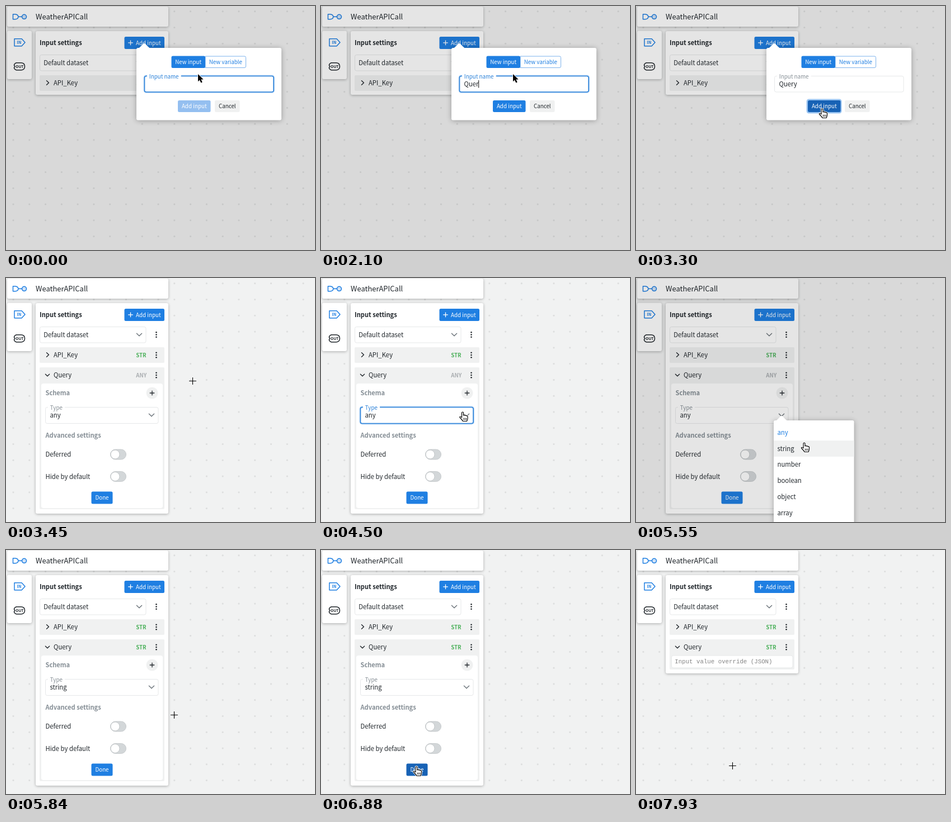
Recreate the animation shown at these times as an HTML page with a canvas. Size 552 by 437 pixels, loop 8 s.

```html
<!DOCTYPE html>
<html lang="en">
<head>
<meta charset="utf-8">
<title>Input settings</title>
<style>
html, body { margin: 0; width: 100%; height: 100%; overflow: hidden; background: #f1f2f2; }
canvas { display: block; }
</style>
</head>
<body>
<canvas id="stage" width="552" height="437"></canvas>
<script>
const ctx = document.getElementById('stage').getContext('2d');
const LOOP = 8000, TICK = 150;
const SANS = '"Noto Sans CJK JP", "Noto Sans CJK SC", "Noto Sans CJK", "Open Sans", sans-serif';
const MONO = '"Liberation Mono", monospace';
const BLUE = '#1f7fe2', DARK_BLUE = '#1762b5', INK = '#20262b', GREY = '#858e95';
const PALE = '#f0f1f1', LINE = '#e6e8e9';
const BODY = 11.3, SMALL = 9.8;

function text(str, x, y, { size = BODY, color = INK, weight = 400, family = SANS } = {}) {
  ctx.font = `${weight} ${size}px ${family}`;
  ctx.fillStyle = color;
  ctx.fillText(str, x, y);
  return ctx.measureText(str).width;
}

function box(x, y, w, h, { r = 3, fill, stroke, line = 1, shadow = 0 } = {}) {
  ctx.save();
  ctx.beginPath();
  ctx.roundRect(x, y, w, h, r);
  if (shadow) {
    ctx.shadowColor = 'rgba(0,0,0,.3)';
    ctx.shadowBlur = shadow;
    ctx.shadowOffsetY = 1;
  }
  if (fill) { ctx.fillStyle = fill; ctx.fill(); }
  if (stroke) { ctx.strokeStyle = stroke; ctx.lineWidth = line; ctx.stroke(); }
  ctx.restore();
}

function disc(x, y, r, fill, stroke) {
  ctx.beginPath();
  ctx.arc(x, y, r, 0, Math.PI * 2);
  if (fill) { ctx.fillStyle = fill; ctx.fill(); }
  if (stroke) { ctx.strokeStyle = stroke; ctx.stroke(); }
}

// Draws an SVG path with its origin at x, y.
function path(d, x, y, { fill, stroke, line = 1.5 } = {}) {
  const p = new Path2D(d);
  ctx.save();
  ctx.translate(x, y);
  ctx.lineJoin = ctx.lineCap = 'round';
  if (stroke) { ctx.strokeStyle = stroke; ctx.lineWidth = line; ctx.stroke(p); }
  if (fill) { ctx.fillStyle = fill; ctx.fill(p); }
  ctx.restore();
}

const plus = (x, y, r, color, line = 1.3) =>
  path(`M${-r} 0H${r}M0 ${-r}V${r}`, x, y, { stroke: color, line });
const chevronDown = (x, y, w = 4, color = INK) =>
  path(`M${-w} ${-w / 2}L0 ${w / 2}L${w} ${-w / 2}`, x, y, { stroke: color, line: 1.4 });
const kebab = (x, y) => [-4.3, 0, 4.3].forEach(dy => disc(x, y + dy, 1.3, INK));

function button(label, x, y, w, h, fill, color = '#fff', weight = 500) {
  box(x, y, w, h, { r: 2.5, fill });
  ctx.textAlign = 'center';
  text(label, x + w / 2, y + h / 2 + 3.7, { size: SMALL, color, weight });
  ctx.textAlign = 'left';
}

function field(label, value, x, y, w, h, focused) {
  if (focused) box(x, y, w, h, { stroke: 'rgba(31,127,226,.3)', line: 4 });
  box(x, y, w, h, { fill: '#fff', stroke: focused ? '#2a80d8' : LINE, line: focused ? 1.6 : 1 });
  ctx.font = `400 ${SMALL}px ${SANS}`;
  ctx.fillStyle = '#fff';
  ctx.fillRect(x + 4.5, y - 3, ctx.measureText(label).width + 8, 6);
  text(label, x + 8.3, y + 4, { size: SMALL, color: focused ? '#2a80d8' : GREY });
  return text(value, x + 8, y + 18.8);
}

const cursors = {
  arrow(x, y) {
    path('M0 0V13.2L3 10.4L5.3 15.6L7.7 14.6L5.4 9.5H9.6Z', x, y, { fill: '#000', stroke: '#fff', line: 1.6 });
  },
  hand(x, y) {
    const d = 'M-2 1.5Q-2 0-.5 0Q1 0 1 1.5V6Q2.5 4.8 3.6 6.2Q5 5.3 6.2 6.8Q8.5 6.3 8.5 8.5V11.5' +
      'Q8.3 14 7 16.5H0Q-1 14.5-3 12.5Q-6.5 9.3-5.5 8.5Q-4.5 7.6-2 9.8Z';
    path(d, x, y, { fill: '#fff', stroke: '#fff', line: 3 });
    path(d, x, y, { stroke: '#000', line: 1.2 });
    path('M1.4 11v3M3.7 11v3M6 11v3', x, y, { stroke: '#000', line: 0.9 });
  },
  cross(x, y) {
    path('M-6 0H6M0-6V6', x + 0.5, y + 0.5, { stroke: '#000', line: 1.1 });
  }
};

// Progress of a pointer move made of n equal jumps.
const jumps = (t, start, n, gap = TICK) =>
  Math.max(0, Math.min(n, Math.floor((t - start) / gap) + 1)) / n;
const between = (a, b, k) => a.map((v, i) => v + (b[i] - v) * k);

const FIELD = [343, 122], ADD = [333, 184], TYPE = [253.5, 240], OPTION = [301, 295], DONE = [171, 388];

function pointer(t) {
  if (t < 3450) {
    const k = jumps(t, 2850, 3);
    return [k < 1 ? 'arrow' : 'hand', ...between(FIELD, ADD, k)];
  }
  if (t < 4650) {
    const k = jumps(t, 4050, 3), p = between(ADD, TYPE, k);
    return [k === 1 ? 'hand' : p[0] > 290 ? 'cross' : 'arrow', ...p];
  }
  if (t < 5840) return ['hand', ...between(TYPE, OPTION, jumps(t, 5100, 4))];
  if (t < 7330) {
    const k = jumps(t, 6440, 4, 146.6), p = between([300, 295], DONE, k);
    return [k === 1 ? 'hand' : p[0] > 290 ? 'cross' : 'arrow', ...p];
  }
  return t < 7930 ? null : ['cross', 172, 386];
}

function background() {
  ctx.fillStyle = '#f1f2f2';
  ctx.fillRect(0, 0, 552, 437);
  for (let x = 13; x < 552; x += 28.78)
    for (let y = 9.7; y < 437; y += 28.78) disc(x, y, 1.6, '#dddede');
}

function frameBars() {
  box(2, 1, 288, 36, { fill: '#fff', shadow: 5 });
  path('M0-4.5H4Q9-4 9.5 0Q9 4 4 4.5H0ZM9.5 0H16', 12.5, 19.3, { stroke: BLUE });
  ctx.lineWidth = 1.6;
  disc(32.5, 19.3, 4, '#cfe2f7', BLUE);
  text('WeatherAPICall', 53, 23.8, { size: 13 });

  box(2, 44.5, 44, 86.5, { fill: '#fff', shadow: 5 });
  path('M0-6.5H13L19 0L13 6.5H0Z', 15, 65.2, { stroke: BLUE, line: 1.5 });
  text('IN', 19.5, 68, { size: 7.3, color: BLUE, weight: 700 });
  path('M4-6.5H13Q19-6 19 0Q19 6 13 6.5H4Q0 5 0 2L1.5 0L0-2Q0-5 4-6.5Z', 14.5, 108.3, { stroke: INK, line: 1.5 });
  text('OUT', 17.3, 110.9, { size: 6.6, weight: 700 });
}

function rowHeader(name, type, y, open) {
  if (open) chevronDown(74, y, 3.6);
  else path('M-2-3.8L2 0L-2 3.8', 74.5, y - 0.5, { stroke: INK, line: 1.4 });
  text(name, 85, y + 4.3);
  text(type, 232.3, y + 3.7, { size: 9.6, weight: 700, color: type === 'ANY' ? '#a9adb0' : '#4bb05a' });
  kebab(268.5, y);
}

function toggle(label, y) {
  text(label, 70.5, y + 4.3);
  box(186.5, y - 9, 28, 18, { r: 9, fill: '#d3d7d9', stroke: '#c6cacc' });
  ctx.lineWidth = 1;
  disc(195, y, 8, '#fff', '#c3c7c9');
}

function settings(t) {
  const type = t < 5840 ? 'any' : 'string';
  box(63, 189, 217, 223, { r: 4, fill: '#fff' });
  text('Schema', 70.5, 210, { size: 11.1, weight: 700, color: GREY });
  disc(261, 206, 10.5, PALE);
  plus(261, 206, 3.8, INK);
  field('Type', type, 70.5, 231.5, 201.5, 29, t >= 4500 && t < 4650);
  chevronDown(260, 245.5, 4.6, '#6d757b');
  text('Advanced settings', 70.5, 286, { size: 11.1, weight: 700, color: GREY });
  toggle('Deferred', 316);
  toggle('Hide by default', 355.5);
  button('Done', 152.5, 382.5, 38, 22, t >= 6880 ? DARK_BLUE : BLUE);
}

function panel(t) {
  const added = t >= 3450, expanded = added && t < 7330;
  const bottom = expanded ? 422 : added ? 221 : 159;
  box(53, 45, 237, bottom - 45, { fill: '#fff', shadow: 5 });
  text('Input settings', 60, 70.2, { size: 11.1, weight: 700 });
  box(211.5, 55, 71.5, 22, { r: 2.5, fill: BLUE });
  plus(222.5, 65.8, 3.9, '#fff');
  text('Add input', 232, 69.5, { size: SMALL, color: '#fff', weight: 500 });
  box(60.5, 87.5, 189.5, 28.5, { stroke: LINE });
  text('Default dataset', 67.3, 106);
  chevronDown(238, 101.5, 4.6, '#6d757b');
  kebab(268.5, 101.5);

  box(60, 124, 223, 28, { r: 2, fill: PALE });
  rowHeader('API_Key', 'STR', 138, false);
  if (!added) return;
  box(60, 160, 223, expanded ? 254 : 54, { r: 2, fill: PALE });
  rowHeader('Query', t < 5840 ? 'ANY' : 'STR', 174, true);
  if (expanded) return settings(t);
  box(63.5, 189, 216.5, 22, { fill: '#fff', stroke: LINE });
  text('Input value override (JSON)', 69.3, 203.2, { size: 10.75, color: '#858585', family: MONO });
}

function dim() {
  ctx.fillStyle = 'rgba(0,0,0,.1)';
  ctx.fillRect(0, 0, 552, 437);
}

function popover(x, y, w, h, tipX) {
  box(x, y, w, h, { fill: '#fff', shadow: 10 });
  path('M-11 1Q-8-.5-2-7.3Q0-9.3 2-7.3Q8-.5 11 1Z', tipX, y, { fill: '#fff' });
}

function newInput(t) {
  dim();
  popover(233, 75, 259, 129.5, 247);
  box(356, 90, 72.5, 20.5, { r: [0, 2.5, 2.5, 0], fill: '#fff', stroke: '#7db2ec' });
  text('New variable', 362.7, 103.6, { size: SMALL, color: BLUE });
  button('New input', 295.5, 89.5, 60.5, 21.5, BLUE);

  const typed = [150, 600, 750, 2100, 2550].filter(at => t >= at).length;
  const focused = t < 3300;
  const width = field('Input name', 'Query'.slice(0, typed), 247.5, 125.5, 230.5, 28.5, focused);
  const caretOn = t >= 150 && focused && !(t >= 1350 && t < 1800);
  if (caretOn) {
    ctx.fillStyle = '#000';
    ctx.fillRect(255.3 + width, 133, 1, 13.5);
  }

  if (t >= 3300) box(306, 168, 60, 23, { stroke: 'rgba(31,127,226,.45)', line: 3 });
  const fill = t < 150 ? '#94bff0' : t < 300 ? '#5a9fe9' : t < 3150 ? BLUE : DARK_BLUE;
  button('Add input', 307, 169, 58.5, 21, fill);
  button('Cancel', 373, 169, 44.5, 21, PALE, INK, 400);
}

function typeMenu(hoverY) {
  dim();
  popover(246, 255, 143.5, 200, 260);
  ['any', 'string', 'number', 'boolean', 'object', 'array'].forEach((name, i) => {
    const top = 262.4 + i * 28.78;
    if (hoverY >= top && hoverY < top + 28.78) {
      ctx.fillStyle = PALE;
      ctx.fillRect(246, top, 143.5, 28.78);
    }
    text(name, 252.5, top + 18.4, { color: i ? INK : BLUE });
  });
}

function draw(t) {
  const cursor = pointer(t);
  background();
  frameBars();
  panel(t);
  if (t < 3450) newInput(t);
  else if (t >= 4650 && t < 5840) typeMenu(cursor[2]);
  if (cursor) cursors[cursor[0]](cursor[1], cursor[2]);
}

function tick() {
  draw(performance.now() % LOOP);
  requestAnimationFrame(tick);
}
tick();
</script>
</body>
</html>
```
